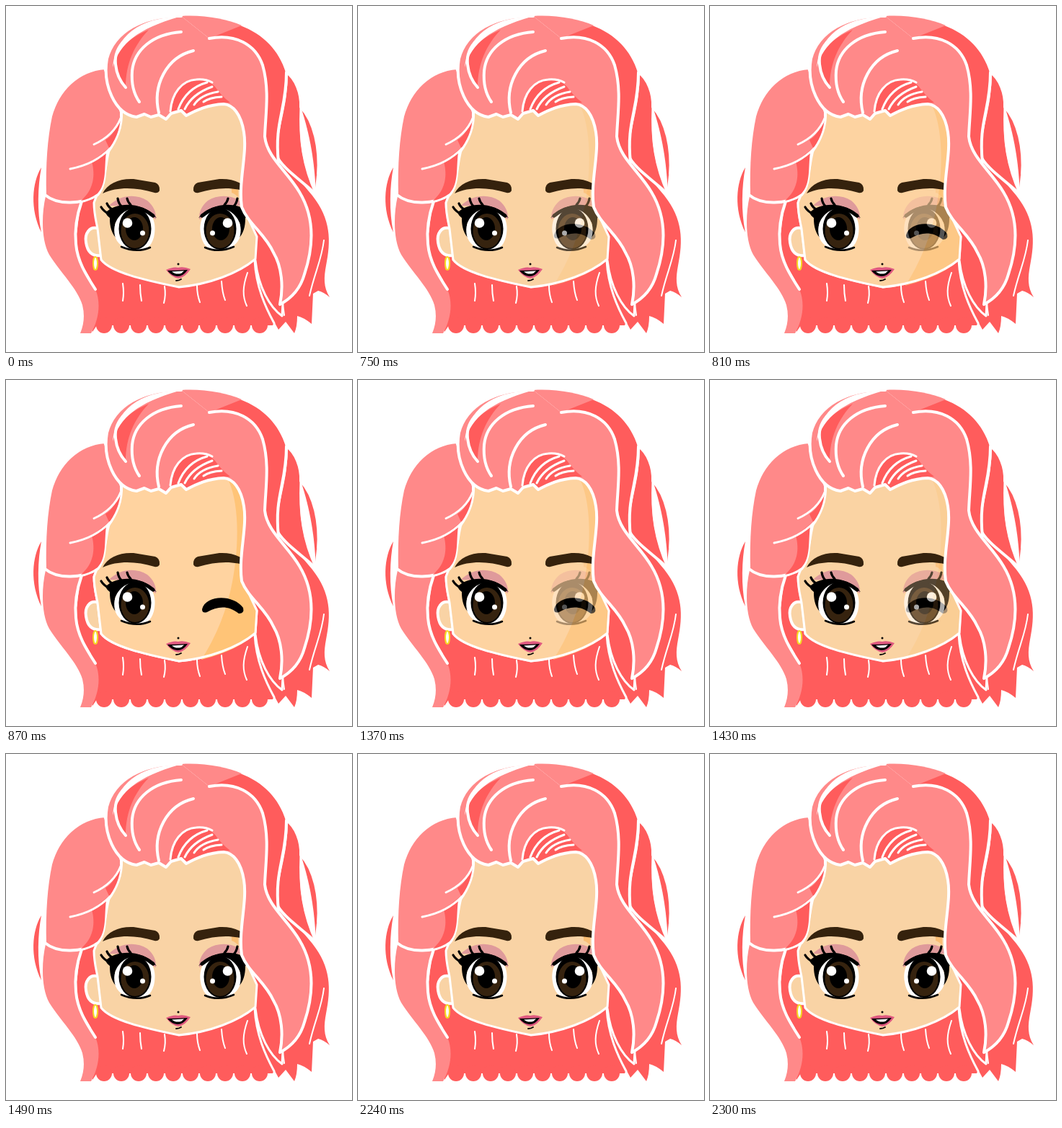
These frames come from a looping animation (480x480 px, 2.36 s). An HTML page without scripts:

```html
<!DOCTYPE html>
<html lang="en">
<head>
<meta charset="utf-8">
<title>Winking girl</title>
<style>
  html, body { margin: 0; width: 100%; height: 100%; overflow: hidden; background: #fff; }
  svg { display: block; width: 100vw; height: 100vh; }
  .light { fill: #ff8989; }
  .dark { fill: #ff5c5c; }
  .gap { fill: #fff; }
  .skin { fill: #f9d3a5; }
  .edge { stroke: #fff; stroke-width: 4; stroke-linejoin: round; }
  .line { fill: none; stroke: #fff; stroke-width: 4; stroke-linecap: round; stroke-linejoin: round; }
  .mid { stroke-width: 3; }
  .thin { stroke-width: 2; }
  .ink { fill: none; stroke: #000; stroke-linecap: round; }
  .brow { fill: #35220d; }

  /* Wink fades in and out in hard 60 ms steps */
  .wink { opacity: 0; animation: wink 2360ms step-end infinite; }
  @keyframes wink {
    0% { opacity: 0; }
    31.78% { opacity: .33; }
    34.322% { opacity: .67; }
    36.864% { opacity: 1; }
    58.051% { opacity: .67; }
    60.593% { opacity: .33; }
    63.136%, 100% { opacity: 0; }
  }
</style>
</head>
<body>
<svg viewBox="0 0 480 480">
  <defs>
    <path id="face" d="M160 140C151 170 143 195 140 215C137 240 127 259 122 273C122 288 125 298 127 309L132 352C145 369 190 380 240 390C282 386 322 371 346 351L348 320L335 292L330 150L300 130L230 140Z"/>
    <path id="bang" d="M282 45C318 38 346 53 356 82C366 117 360 150 359 181C362 210 390 229 407 258C427 291 428 330 414 372C408 394 395 406 380 414C385 390 383 362 371 342C360 317 336 302 327 279C322 244 335 205 330 175C326 150 315 137 302 136C280 137 265 144 250 152L243 145L229 149L222 157L212 151L201 154L192 150L181 154C150 150 134 108 140 73C150 36 190 12 243 14"/>
    <g id="eye">
      <path fill="#df9a9b" d="M143 277C158 262 180 260 196 270Q209 281 208 296L175 278Z"/>
      <path d="M138 287C151 272 190 270 209 294C202 290 197 288 193 288L152 300Q149 310 153 322C144 313 144 299 144 294Q140 291 138 287Z"/>
      <path class="gap" d="M152 322C145 300 160 281 182 280C201 281 209 298 206 316C204 330 197 338 185 339C170 340 157 334 152 322Z"/>
      <ellipse cx="179" cy="309" rx="22.500" ry="29"/>
      <ellipse cx="179" cy="312" rx="19.500" ry="24" fill="#36230f"/>
      <ellipse cx="178" cy="309" rx="12" ry="16"/>
      <circle cx="168.500" cy="301" r="6.800" fill="#fff"/>
      <circle cx="189.500" cy="315" r="3.500" fill="#fff"/>
      <path class="ink" stroke-width="5" d="M147 295C156 278 183 273 204 291"/>
      <path class="ink" stroke-width="2.500" d="M160 334Q181 343 200 335"/>
      <path class="ink" stroke-width="3.200" d="M145 289Q136 286 132 279M151 284Q143 281 140 274M161 279Q156 274 155 267M173 276Q169 272 168 267"/>
    </g>
    <path id="brow" class="brow" d="M134 260C141 246 157 239 177 240L207 245Q214 248 213 256Q211 260 206 259C181 252 157 250 134 260Z"/>
  </defs>

  <!-- Back hair -->
  <path class="dark" d="M49 224C36 245 33 282 49 314C43 285 44 250 49 224Z"/>
  <path class="dark" d="M104 268L95 340L118 380L120 452L126 443H370L372 438L378 449L388 438L400 454Q404 445 404 430Q413 432 424 441L426 399L433 395Q441 397 449 404C440 390 441 376 444 360C451 326 451 296 425 263L330 150L140 200Z"/>
  <path fill="none" stroke="#ff5c5c" stroke-width="22" stroke-linecap="round" stroke-dasharray="0 24" d="M136 443H359"/>
  <path class="line thin" d="M162 385Q164 398 162 409M186 387Q186 399 188 409M220 389Q222 401 219 412M265 388Q265 400 269 411M299 382Q300 398 304 408M335 370C328 390 328 403 334 416M441 325C438 352 428 370 421 402M384 414L386 429"/>
  <path class="line mid" d="M345 353C347 390 360 418 372 440M346 353C350 390 366 418 383 430L384 412"/>

  <!-- Face -->
  <path class="skin edge" d="M129 309C115 304 109 317 111 328C113 341 119 348 132 346Z"/>
  <use href="#face" class="skin line mid" style="fill:#f9d3a5"/>
  <path fill="#fabe74" d="M313 253H322V265Q317 260 313 259Z"/>
  <use href="#eye" transform="matrix(-1 0 0 1 476 0)"/>
  <g class="wink">
    <use href="#face" fill="#ffd3a0"/>
    <path fill="#ffc477" d="M306 134C324 166 324 230 314 280Q303 338 271 388Q325 374 346 351L348 320L335 292L332 150Z"/>
    <path d="M272 318C277 298 315 297 329 316Q331 324 323 324C308 312 293 314 279 322Q272 324 272 318Z"/>
    <use href="#face" class="line mid"/>
  </g>
  <use href="#eye"/>
  <use href="#brow"/>
  <use href="#brow" transform="matrix(-1 0 0 1 473 0)"/>
  <ellipse cx="124" cy="357" rx="3" ry="9" fill="#fff" stroke="#f5d823" stroke-width="2"/>

  <!-- Mouth -->
  <circle cx="239" cy="358" r="1.500"/>
  <path fill="#df5980" d="M222 366Q233 361 239 363Q246 361 256 365Q248 377 239 378Q229 376 222 366Z"/>
  <path d="M224 367Q239 367 252 366Q246 375 238 375Q229 374 224 367Z"/>
  <path class="gap" d="M230 368.500L247 367.500L243 371Q235 373 230 368.500Z"/>
  <path class="ink" stroke-width="1.800" d="M236 381Q240 381 243 379"/>

  <!-- Left hair -->
  <path class="light" d="M55 264C49 290 49 325 60 345C75 369 100 393 106 415Q111 435 103 454L118 454C129 435 132 411 124 393C111 373 99 354 97 330C95 310 99 288 105 271Z"/>
  <path class="line" d="M105 271C99 288 95 310 97 330C99 354 111 373 124 393"/>
  <path class="light edge" d="M137 86C99 89 72 117 62 153C55 186 53 224 54 262C72 277 106 275 127 262C140 247 136 220 141 203C152 188 161 170 160 147Z"/>
  <path class="dark" d="M159 154C152 173 147 180 138 186L143 197L119 216C124 234 122 255 104 270Q116 268 127 260C140 246 136 225 139 203Q158 180 159 154Z"/>
  <path class="line mid" d="M159 156C152 173 140 184 122 192M145 197C130 212 114 221 89 226"/>

  <!-- Right hair -->
  <path class="dark edge" d="M389 92C402 100 410 122 409 140C428 160 436 198 433 235L430 261C410 242 382 225 374 205C374 170 389 141 389 92Z"/>
  <path class="gap" d="M409 140C405 185 411 222 430 261C428 215 422 180 409 140Z"/>
  <path class="line mid" d="M409 140C407 185 412 222 430 261"/>
  <path class="dark" d="M282 44L325 27C357 39 379 62 388 92C390 145 373 164 378 217L350 200L340 70Z"/>
  <path class="line" d="M389 92C389 145 372 160 378 217"/>

  <!-- Front hair -->
  <path class="light" d="M243 14C274 12 306 18 327 27L282 45Z"/>
  <use href="#bang" class="light"/>
  <path class="dark" d="M152 76C157 56 174 43 198 33C178 54 166 80 166 113Q151 99 152 76Z"/>
  <path class="dark" d="M228 148C230 122 244 103 264 102Q281 102 290 112Q299 125 311 134Q278 135 250 152L243 145Z"/>
  <use href="#bang" class="line"/>
  <path class="gap" d="M240 15C185 16 152 42 148 85C158 52 182 32 240 15Z"/>
  <path class="line" d="M212 22C171 34 149 56 152 81Q154 100 166 113M243 36C203 39 178 61 175 90Q173 116 185 133M260 62C222 71 203 111 212 148"/>
  <path class="line mid" d="M228 146C230 121 244 103 264 102Q277 101 286 106M239 143Q250 114 279 106M248 143Q258 122 286 112M261 137Q270 123 294 119M274 133Q282 127 299 126"/>
</svg>
</body>
</html>
```
